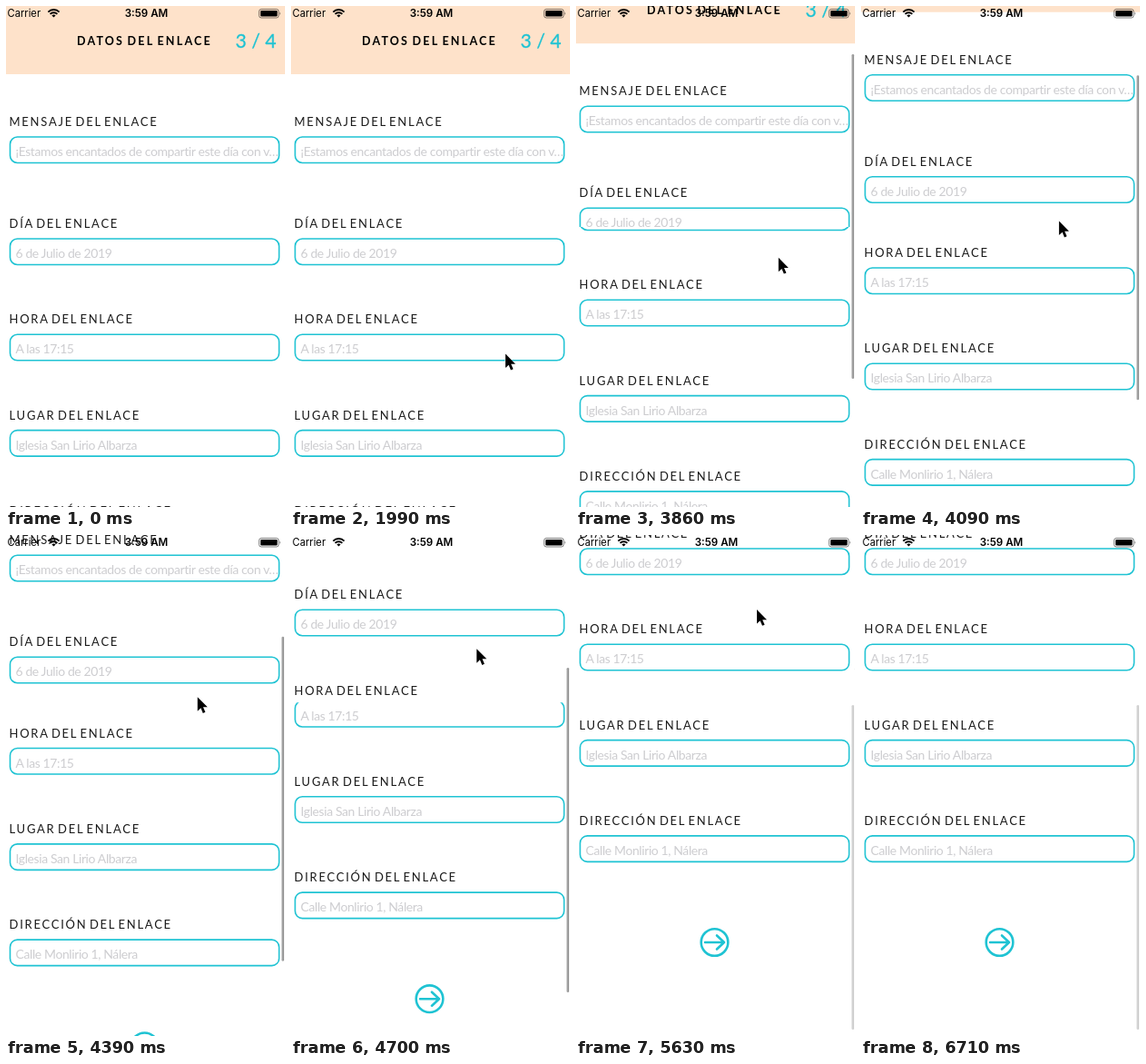
Recreate the animation shown at these times as an HTML page. Size 307 px wide and 551 px high, loop 7.17 s.

```html
<!DOCTYPE html>
<html lang="es">
<head>
<meta charset="utf-8">
<title>Datos del enlace</title>
<style>
  html, body { margin: 0; width: 100%; height: 100%; overflow: hidden; background: #fff; }
  svg { display: block; width: 307px; height: 551px; }
  text { font-family: Lato, sans-serif; white-space: pre; }
  .title { font-size: 12.5px; font-weight: 700; letter-spacing: 2.2px; word-spacing: -1.8px; }
  .step { font-size: 21px; letter-spacing: .1px; fill: #1fc3d3; stroke: #1fc3d3; stroke-width: .3; }
  .label { font-size: 13px; letter-spacing: 1.75px; word-spacing: -2.5px; fill: #1c1c1c; }
  .hint { font-size: 14px; letter-spacing: -.4px; fill: #cdcdd0; }
  .line { fill: none; stroke: #1fc3d3; stroke-width: 1.6; }
  .bold { stroke-width: 2.6; stroke-linecap: round; stroke-linejoin: round; }
  .status text { font: 11.2px Inter, sans-serif; }
  .status .clock { font-weight: 600; font-size: 11.6px; }
</style>
</head>
<body>
<svg viewBox="0 0 307 551">
  <defs>
    <clipPath id="upperClip"><rect id="upperRect" width="307" height="551"/></clipPath>
    <clipPath id="lowerClip"><rect id="lowerRect" width="307" height="551"/></clipPath>
    <g id="page">
      <rect width="307" height="75" fill="#fee2ca"/>
      <text class="title" x="78" y="42.5">DATOS DEL ENLACE</text>
      <text class="step" x="252.5" y="45.5">3 / 4</text>
      <g id="fields"></g>
      <circle class="line bold" cx="152.5" cy="689" r="14.8"/>
      <path class="line bold" d="M142 689H163M155 681.5L163 689L155 696.5"/>
    </g>
  </defs>

  <g clip-path="url(#upperClip)"><use id="upper" href="#page"/></g>
  <g clip-path="url(#lowerClip)"><use id="lower" href="#page"/></g>
  <rect id="bar" x="303.4" width="2.6" height="357" rx="1.3" fill="#8c8c8c"/>

  <g class="status">
    <text x="1.5" y="12">Carrier</text>
    <g fill="none" stroke="#000" stroke-width="1.9">
      <path d="M46.4 6.6A8.6 8.6 0 0 1 58.6 6.6"/>
      <path d="M48.6 8.9A5.5 5.5 0 0 1 56.4 8.9"/>
    </g>
    <path d="M52.5 12.6L50.4 10.5A3 3 0 0 1 54.6 10.5Z"/>
    <text class="clock" x="154.5" y="12" text-anchor="middle">3:59 AM</text>
    <rect x="278.5" y="3.5" width="21.5" height="9.5" rx="2.4" fill="none" stroke="#000" stroke-opacity=".5"/>
    <rect x="280" y="5" width="18.5" height="6.5" rx="1.2"/>
    <path d="M301.3 6.6Q303 8.2 301.3 9.9Z" fill-opacity=".6"/>
  </g>

  <path id="cursor" d="M0 0V15.5L3.6 12.2L6 17.8L8.6 16.7L6.2 11.2H11Z" stroke="#fff" paint-order="stroke"/>
</svg>

<script>
const LOOP = 7170, TICK = 76.5, END = 241;
const $ = id => document.getElementById(id);
const set = (id, name, value) => $(id).setAttribute(name, value);

const fields = [
  ['MENSAJE', '¡Estamos encantados de compartir este día con v…'],
  ['DÍA', '6 de Julio de 2019'],
  ['HORA', 'A las 17:15'],
  ['LUGAR', 'Iglesia San Lirio Albarza'],
  ['DIRECCIÓN', 'Calle Monlirio 1, Nálera']
];
$('fields').innerHTML = fields.map(([name, hint], i) => {
  const y = i ? 256 + 105.3 * (i - 1) : 144;
  return `
    <text class="label" x="3.5" y="${y - 12}">${name} DEL ENLACE</text>
    <rect class="line" x="4.5" y="${y}" width="296" height="28.5" rx="8"/>
    <text class="hint" x="10.5" y="${y + 21}">${hint}</text>`;
}).join('');

const mix = (a, b, k) => a + (b - a) * k;
const ease = (t, from, to) => {
  const u = Math.min(1, Math.max(0, (t - from) / (to - from)));
  return u * u * (3 - 2 * u);
};

// pointer moves: enter, two nudges, drag, leave
const home = { x: 263, y: 560 };
const moves = [
  { from: 500, to: 1220, x: 232, y: 417 },
  { from: 1340, to: 2080, x: 236, y: 382 },
  { from: 2100, to: 2840, x: 229, y: 327.5 },
  { from: 3300, to: 5210, x: 199, y: 82 },
  { from: 5720, to: 6620, x: 308, y: 556 }
];
const pointer = t => moves.reduce((p, m) => {
  const k = ease(t, m.from, m.to);
  return { x: mix(p.x, m.x, k), y: mix(p.y, m.y, k) };
}, home);

function draw(time) {
  // the screen refreshes in even steps
  const t = 3476 + TICK * Math.floor((time - 3441) / TICK);
  const p = pointer(t);
  const scroll = Math.max(0, mix(-4, END, ease(t, 3315, 5380)));

  // while scrolling, the part above the tear trails a little
  const lag = scroll < END ? Math.min(5, scroll / 9) : 0;
  const tear = lag ? 243 - (t - 3860) * .07 : 551;

  set('upperRect', 'height', tear);
  set('lowerRect', 'y', tear);
  set('upper', 'y', lag - scroll);
  set('lower', 'y', -scroll);
  set('bar', 'y', 28 + .66 * scroll);
  set('bar', 'opacity', scroll < 1 ? 0 : t < 5600 ? .85 : .4);
  set('cursor', 'transform', `translate(${p.x} ${p.y})`);
}

const start = performance.now();
function loop() {
  draw((performance.now() - start) % LOOP);
  requestAnimationFrame(loop);
}
loop();
</script>
</body>
</html>
```
